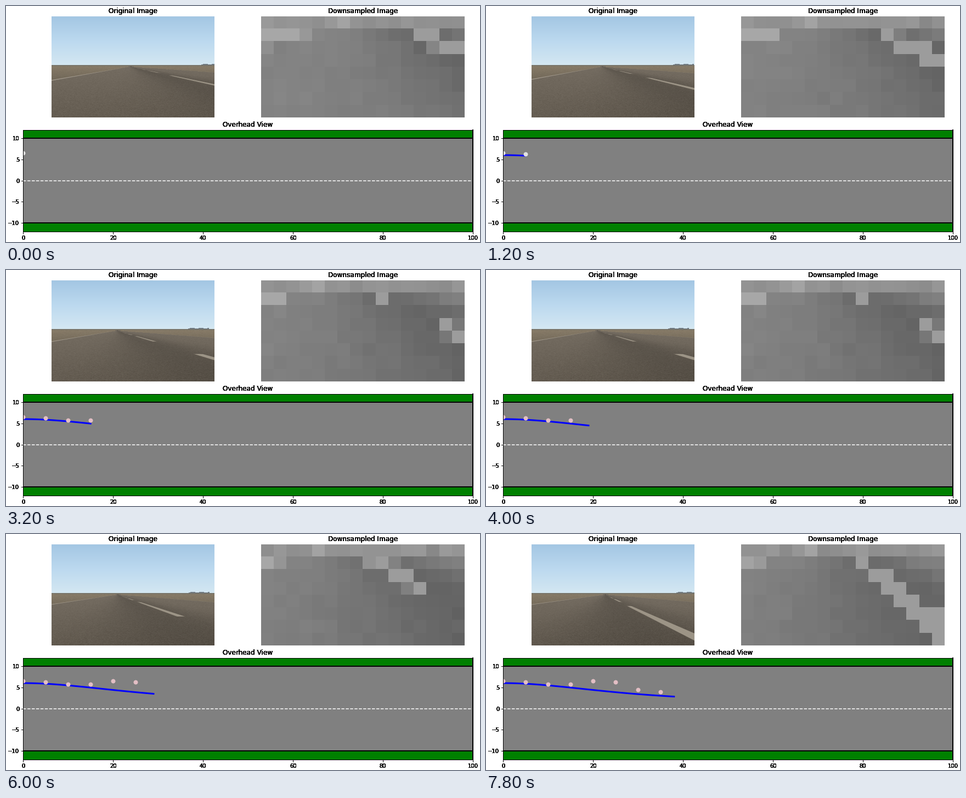
A matplotlib script for the animation above (8 s loop, 864 by 432 pixels).

```python
import numpy as np
import matplotlib.pyplot as plt
from matplotlib.animation import FuncAnimation

W, H = 864, 432
FRAMES, INTERVAL, HOLD = 40, 200, 5
LAYERS = 8

# Camera pose per observation: vanishing point, centre line slope, left edge slope
VANISH = [226, 211, 206, 202, 200, 203, 210, 217]
CENTRE = [4.62, 4.15, 3.80, 3.47, 3.28, 2.90, 2.54, 2.12]
LEFT = [5.7, 5.5, 5.6, 5.95, 6.3, 6.7, 7.0, 7.4]
ESTIMATE = [6.58, 6.22, 5.83, 5.83, 6.48, 6.22, 4.54, 3.90]
PATH = np.polyfit([0, 5, 10, 15, 19, 24, 29, 38],
                  [6.03, 5.88, 5.5, 4.97, 4.53, 3.98, 3.52, 2.85], 4)

PHOTO = (83, 19, 297, 185)
COARSE = (465, 19, 371, 185)
ROAD = (31.2, 226.7, 819.8, 186)
HORIZON = 111


def mix(a, b, t):
    t = np.asarray(t)[..., None]
    return np.asarray(a) * (1 - t) + np.asarray(b) * t


def stripe(x, dy, vanish, slope, half):
    """Coverage of a ground stripe that runs to the vanishing point."""
    scale = np.maximum(dy, 0) / np.hypot(1, slope)
    off = np.abs((x - vanish) / np.maximum(dy, 0.5) - slope)
    return np.clip(np.minimum(2 * half * scale, (half - off) * scale + 0.5), 0, 1)


def dashes(x, dy, i):
    """Centre line dashes, evenly spaced in depth and drawing closer."""
    gate = np.zeros_like(dy)
    for j in range(-1, 4):
        near = 0.0885 + 0.0755 * j - 0.0127 * i
        far = near + 0.0485
        if far > 0.008:
            lo, hi = 1 / far, 1 / max(near, 0.008)
            gate = np.maximum(gate, np.clip(dy - lo + 0.5, 0, 1)
                              * np.clip(hi - dy + 0.5, 0, 1))
    return gate * stripe(x, dy, VANISH[i], CENTRE[i], 0.18)


def edges(x, dy, i):
    left = stripe(x, dy, VANISH[i], -LEFT[i], 0.18)
    right = stripe(x, dy, VANISH[i], CENTRE[i] + 9.8, 0.2)
    return left, right


def photo(i):
    x0, y0, w, h = PHOTO
    x, y = np.meshgrid(x0 + np.arange(w) + 0.5, y0 + np.arange(h) + 0.5)
    dy = y - HORIZON
    vanish, slope = VANISH[i], CENTRE[i]
    rng = np.random.default_rng(i)

    t = np.clip((y - y0) / (HORIZON - y0), 0, 1)
    sky = np.stack([np.interp(t, [0, 0.5, 1], c) for c in
                    [(163, 188, 213), (198, 217, 232), (227, 239, 242)]], axis=-1)

    depth = np.clip(dy / 93, 0, 1)
    side = (x - vanish) / np.maximum(dy, 0.5)
    tar = mix((116, 108, 97), (101, 93, 82), depth)
    sand = mix((134, 122, 103), (112, 103, 88), np.clip(dy / 25, 0, 1))
    outside = np.clip(np.maximum(-LEFT[i] - side, side - slope - 9.8) * 4, 0, 1)
    ground = mix(tar, sand, outside)
    worn = np.exp(-((side - slope + 1) / 2.4) ** 2)
    ground = ground * (1 - 0.17 * worn)[..., None]
    grain = rng.normal(0, 4, (h, w))
    grain = (grain + np.roll(grain, 1, axis=1)) / 2
    ground = ground + (grain * (0.4 + 0.6 * depth))[..., None]

    left, right = edges(x, dy, i)
    ground = mix(ground, (168, 159, 145), left * 0.85)
    ground = mix(ground, (148, 139, 122), right * 0.6)
    ground = mix(ground, (156, 148, 134), dashes(x, dy, i))

    img = np.where((dy > 0)[..., None], ground, sky)
    img[(dy > -2) & (dy <= 0)] = (120, 116, 105)
    u = x - vanish - 130
    hill = np.where((u > 0) & (u < 38), 0.6 + 1.4 * np.abs(np.sin(u / 5)), 0)
    img[(dy <= -2) & (dy > -2 - hill)] = (112, 122, 130)
    return np.clip(img, 0, 255).astype(np.uint8)


def cells(a):
    return a.reshape(8, 11, 16, 18).mean(axis=(1, 3))


def downsampled(i):
    x, dy = np.meshgrid(PHOTO[0] + PHOTO[2] * (np.arange(288) + 0.5) / 288,
                        2.5 + np.arange(88))
    vanish, slope = VANISH[i], CENTRE[i]
    rng = np.random.default_rng(40 + i)
    col = np.arange(16)
    side = (cells(x) - vanish) / cells(dy)
    dark = np.exp(-((side - slope) / 4) ** 2)
    grid = 132 - 33 * dark * (0.4 + 0.6 * col / 15)
    grid += rng.normal(0, 1.5, grid.shape)
    grid[0] = 146 + rng.normal(0, 4, 16)
    grid[0, int((vanish - 130) / 16)] = 164

    left, right = edges(x, dy, i)
    for mask, tone in ((left, 167), (right, 146), (dashes(x, dy, i), 156)):
        hit = np.clip((cells(mask) - 0.03) / 0.05, 0, 1)
        hit[0] = 0
        grid += hit * (tone - grid)
    return grid


def add_axes(x, y, w, h):
    return fig.add_axes([x / W, 1 - (y + h) / H, w / W, h / H])


def picture(box, title, data, **kw):
    ax = add_axes(*box)
    ax.axis("off")
    im = ax.imshow(data, aspect="auto", interpolation="nearest", **kw)
    # Stacked copies give the heavy, crisp lettering
    for _ in range(LAYERS):
        layer = add_axes(*box)
        layer.axis("off")
        layer.set_title(title)
    return im


def limits(ax):
    ax.set(xlim=(0, 100), ylim=(-12, 12))


fig = plt.figure(figsize=(W / 72, H / 72), dpi=72, facecolor="white")
views = [(photo(i), downsampled(i)) for i in range(len(VANISH))]
camera = picture(PHOTO, "Original Image", views[0][0])
coarse = picture(COARSE, "Downsampled Image", views[0][1],
                 cmap="gray", vmin=0, vmax=255)

road = add_axes(*ROAD)
road.axis("off")
limits(road)
road.axhspan(-12, 12, color="green", lw=0)
road.axhspan(-10, 10, color="gray", lw=0)
for edge in (-10, 10):
    road.axhline(edge, color="black", lw=2)
road.axhline(0, color="white", ls="--", lw=1.5)
track, = road.plot([], [], color="blue", lw=3, zorder=3)
dots, = road.plot([], [], "o", ms=8, mew=0, zorder=4)

for _ in range(LAYERS):
    frame = add_axes(*ROAD)
    frame.patch.set_visible(False)
    limits(frame)
    frame.set_xticks(range(0, 101, 20))
    frame.set_yticks(range(-10, 11, 5))
    frame.spines["right"].set_linewidth(1.5)
    frame.set_title("Overhead View")


def update(k):
    step = max(0, k - 1)
    i = step // HOLD
    camera.set_data(views[i][0])
    coarse.set_data(views[i][1])
    xs = np.arange(step + 1)
    track.set_data(xs, np.polyval(PATH, xs))
    dots.set_data(HOLD * np.arange(i + 1), ESTIMATE[:i + 1])
    dots.set_color("#e2e2e2" if i < 3 else "#e3bec4")
    return camera, coarse, track, dots


anim = FuncAnimation(fig, update, frames=FRAMES, interval=INTERVAL,
                     repeat=True, repeat_delay=0, blit=False)
plt.show()
```
